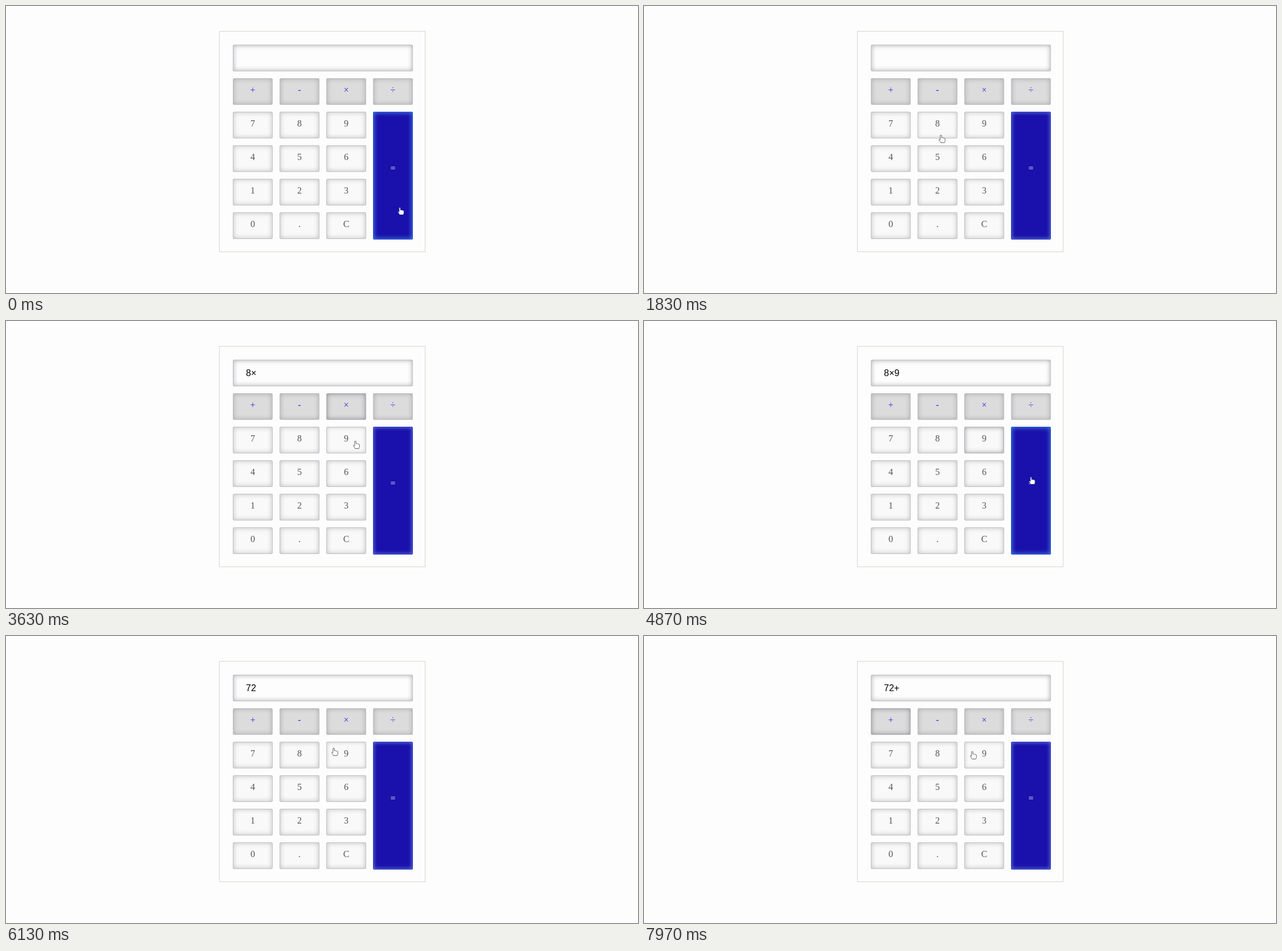
Recreate the animation shown at these times as an HTML page. Size 1109x505 px, loop 8 s.

```html
<!DOCTYPE html>
<html lang="en">
<head>
<meta charset="utf-8">
<title>Calculator</title>
<style>
  html, body { margin: 0; width: 100%; height: 100%; overflow: hidden; background: #fdfdfd; }
  div { position: absolute; box-sizing: border-box; }
  #frame { left: 374px; top: 44px; width: 362px; height: 389px; border: 1px solid #d5d5cf; }
  .key, #display {
    border: 1px solid #c2c2c4; border-radius: 2px;
    box-shadow: inset 0 0 8px rgba(50, 50, 70, .3);
    display: flex; align-items: center;
  }
  #display {
    left: 398px; top: 68px; width: 316px; height: 47px; padding-left: 22px;
    font: 16px "Liberation Sans", Arial, sans-serif; color: #000;
    box-shadow: inset 0 0 9px rgba(50, 50, 70, .4);
  }
  .key {
    width: 70px; height: 47px; padding-bottom: 4px; justify-content: center;
    font: 16px "Liberation Serif", "Times New Roman", serif;
    color: #555; background: #f9f9f9;
  }
  .key.operator { color: #3b25df; background: #dcdcdc; }
  .key.hover { box-shadow: inset 0 0 7px rgba(50, 50, 70, .24); }
  .key.focus { border-color: #b2b2b6; box-shadow: inset 0 0 9px rgba(40, 40, 60, .45); }
  .key.equals {
    height: 225px; padding-bottom: 24px; color: #fff; background: #1a10ab;
    border-color: #2b3fc0; box-shadow: inset 0 0 7px #6a8be0;
  }
  .key.equals.hover { border-color: #2458cc; box-shadow: inset 0 0 9px #4b90ee; }
  svg { position: absolute; left: 0; top: 0; overflow: visible; }
  #cursor path { fill: #fff; stroke: #555; stroke-width: .9; stroke-linejoin: round; }
  #cursor.light path { stroke: #17108c; }
</style>
</head>
<body>
<div id="frame"></div>
<div id="display"></div>
<svg id="cursor" width="16" height="18">
  <path id="hand" d="M-1.2 .8Q0-.6 1.2 .8V5Q2.4 4 3.4 5.2Q4.6 4.5 5.4 5.7Q7.3 5.2 7.3 7.2V9.5Q7.3 11.5 6.2 13.5H-.4Q-1.2 11.5-3.3 8.8Q-3.6 7.2-2.2 7.5L-1.2 8.4Z"/>
  <path id="arrow" d="M0 0V10.2L2.4 8L4 11.4L5.4 10.7L3.9 7.5H7.2Z"/>
</svg>
<script>
const LOOP = 8000;
const $ = id => document.getElementById(id);
const display = $('display'), cursor = $('cursor'), hand = $('hand'), arrow = $('arrow');

const keys = [];
function addKey(label, col, row, kind = '') {
  const el = document.createElement('div');
  const key = { label, kind, el, x: 398 + 82 * col, y: 126.5 + 59 * row, h: kind === 'equals' ? 225 : 47 };
  el.textContent = label;
  el.style.left = key.x + 'px';
  el.style.top = key.y + 'px';
  document.body.insertBefore(el, cursor);
  keys.push(key);
}
[...'+-×÷'].forEach((c, i) => addKey(c, i, 0, 'operator'));
[...'7894561230.C'].forEach((c, i) => addKey(c, i % 3, 1 + Math.floor(i / 3)));
addKey('=', 3, 1, 'equals');

// Pointer stops: time, x, y
const path = [
  [0, 691, 354], [120, 691, 354], [830, 737, 156], [1150, 738, 156],
  [1830, 521, 227], [2080, 519, 213], [2480, 519, 213],
  [2980, 601, 157], [3280, 601, 157], [3630, 613, 211],
  [4250, 613, 211], [4870, 679, 274], [5450, 679, 274],
  [6130, 575, 197], [6350, 573, 195], [6800, 437, 155],
  [7200, 437, 155], [7750, 576, 203], [LOOP, 576, 203]
];
// Clicks: time, key, resulting display text
const clicks = [
  [0, '', ''], [2200, '8', '8'], [3080, '×', '8×'],
  [4000, '9', '8×9'], [5050, '=', '72'], [6950, '+', '72+']
];

function pointerAt(t) {
  const i = path.findIndex(p => p[0] > t);
  const [t0, x0, y0] = path[i - 1], [t1, x1, y1] = path[i];
  const u = (t - t0) / (t1 - t0), e = u * u * (3 - 2 * u);
  return [x0 + (x1 - x0) * e, y0 + (y1 - y0) * e];
}

function render(now) {
  const t = now % LOOP;
  const [x, y] = pointerAt(t).map(Math.round);
  const [, pressed, text] = clicks.filter(c => c[0] <= t).pop();
  const over = keys.find(k => x >= k.x && x < k.x + 70 && y >= k.y && y < k.y + k.h);

  display.textContent = text;
  for (const k of keys) {
    const state = k === over ? ' hover' : k.label === pressed ? ' focus' : '';
    k.el.className = 'key ' + k.kind + (k.kind === 'equals' && state === ' focus' ? '' : state);
  }
  cursor.style.transform = `translate(${x}px, ${y}px)`;
  cursor.setAttribute('class', over && over.kind === 'equals' ? 'light' : '');
  hand.style.display = over ? '' : 'none';
  arrow.style.display = over ? 'none' : '';
}

const start = performance.now();
function tick() {
  render(performance.now() - start);
  requestAnimationFrame(tick);
}
tick();
</script>
</body>
</html>
```
